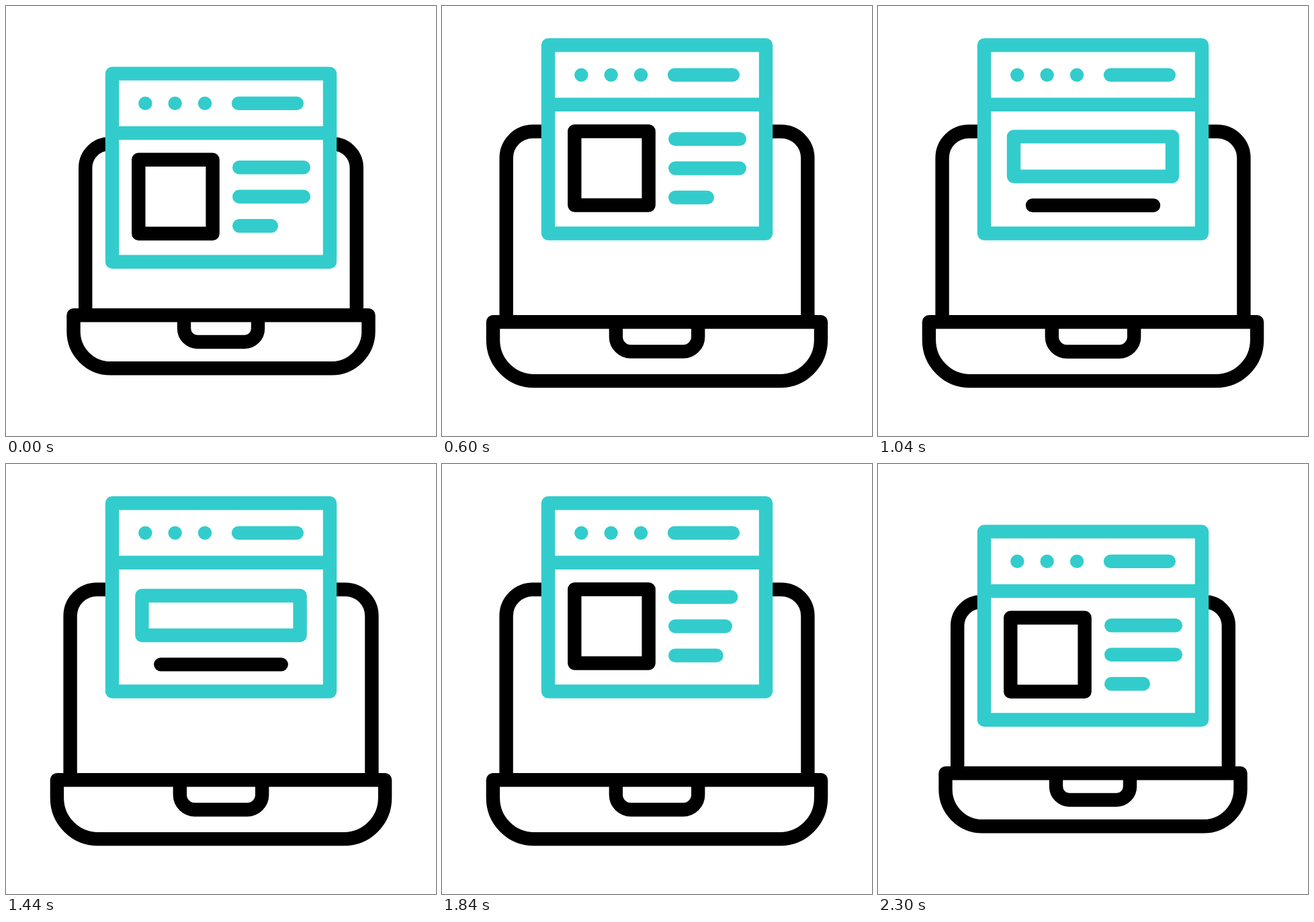
An HTML page with a canvas that plays this animation: 640 by 640 pixels, repeating every 2.4 s.

```html
<!DOCTYPE html>
<html>
<head>
<meta charset="utf-8">
<style>
html, body { margin: 0; width: 100%; height: 100%; overflow: hidden; background: #fff; }
canvas { display: block; }
</style>
</head>
<body>
<canvas id="stage" width="640" height="640"></canvas>
<script>
const ctx = document.getElementById('stage').getContext('2d');
const TEAL = '#33cccc', BLACK = '#000', LOOP = 2400, TRAVEL = 195;

const mix = (a, b, k) => a + (b - a) * k;
const ramp = (t, a, b) => Math.min(1, Math.max(0, (t - a) / (b - a)));
const smooth = u => u * u * (3 - 2 * u);
const easeOut = u => 1 - (1 - u) ** 3;
const ease = (t, a, b) => smooth(ramp(t, a, b));

function stroke(color) {
  ctx.strokeStyle = color;
  ctx.stroke();
}

function line(x1, x2, y, color) {
  ctx.beginPath();
  ctx.moveTo(x1, y);
  ctx.lineTo(x2, y);
  stroke(color);
}

function box(x, y, w, h, color) {
  ctx.beginPath();
  ctx.rect(x, y, w, h);
  stroke(color);
}

// Scales the outline about its centre while the line weight stays constant.
function laptop(grow) {
  const s = mix(1, 1.112, grow);
  ctx.save();
  ctx.translate(320, 371);
  ctx.scale(s, s);
  ctx.translate(-320, -371);
  ctx.beginPath();
  ctx.moveTo(118.2, 460.3);
  ctx.arcTo(118.2, 205.3, 320, 205.3, 35.5);
  ctx.arcTo(521.8, 205.3, 521.8, 460.3, 35.5);
  ctx.lineTo(521.8, 460.3);
  ctx.moveTo(100.5, 460.3);
  ctx.arcTo(100.5, 539.3, 320, 539.3, 55);
  ctx.arcTo(539.5, 539.3, 539.5, 460.3, 55);
  ctx.lineTo(539.5, 460.3);
  ctx.closePath();
  ctx.moveTo(265, 460.3);
  ctx.arcTo(265, 500, 320, 500, 20);
  ctx.arcTo(375, 500, 375, 460.3, 20);
  ctx.lineTo(375, 460.3);
  ctx.restore();
  stroke(BLACK);
}

function article(edit) {
  box(197.3, 186.5, 110.3, 110, BLACK);
  line(347.2, 442.8 - 24 * edit, 198, TEAL);
  line(347.2, 442.8 - 40 * edit, 241.5, TEAL);
  line(347.2, 394.8 + 26 * edit, 285, TEAL);
}

function form(size) {
  const w = 236 * size, h = 59.2 * size;
  box(320 - w / 2, 224 - h / 2, w, h, TEAL);
  line(320 - 90 * size, 320 + 90 * size, 296.8, BLACK);
}

function page(edit, scroll) {
  ctx.save();
  ctx.beginPath();
  ctx.rect(158, 147, 324, 191.5);
  ctx.clip();
  ctx.translate(0, -TRAVEL * scroll);
  article(edit);
  ctx.translate(0, TRAVEL);
  if (scroll > 0) form(mix(0.56, 1, scroll));
  ctx.restore();
}

function browser(drop, edit, scroll) {
  ctx.save();
  ctx.translate(0, drop);
  ctx.fillStyle = '#fff';
  ctx.fillRect(158, 58.3, 324, 280.2);
  page(edit, scroll);
  box(158, 58.3, 324, 280.2, TEAL);
  line(158, 482, 146.8, TEAL);
  for (const x of [207.3, 251.6, 296]) line(x, x + 0.01, 102.6, TEAL);
  line(346, 432.8, 102.6, TEAL);
  ctx.restore();
}

function draw(t) {
  const fall = ease(t, 1965, 2300);
  const rise = ease(t, 200, 600) - fall;
  const grow = ease(t, 215, 615) - fall;
  const edit = ease(t, 600, 745) - ease(t, 1730, 1960);
  const scroll = easeOut(ramp(t, 750, 1040)) - ease(t, 1425, 1730);
  ctx.clearRect(0, 0, 640, 640);
  ctx.lineWidth = 20.4;
  ctx.lineCap = ctx.lineJoin = 'round';
  laptop(grow);
  browser(42.3 * (1 - rise), edit, scroll);
}

const start = performance.now();
function tick() {
  draw((performance.now() - start) % LOOP);
  requestAnimationFrame(tick);
}
tick();
</script>
</body>
</html>
```
